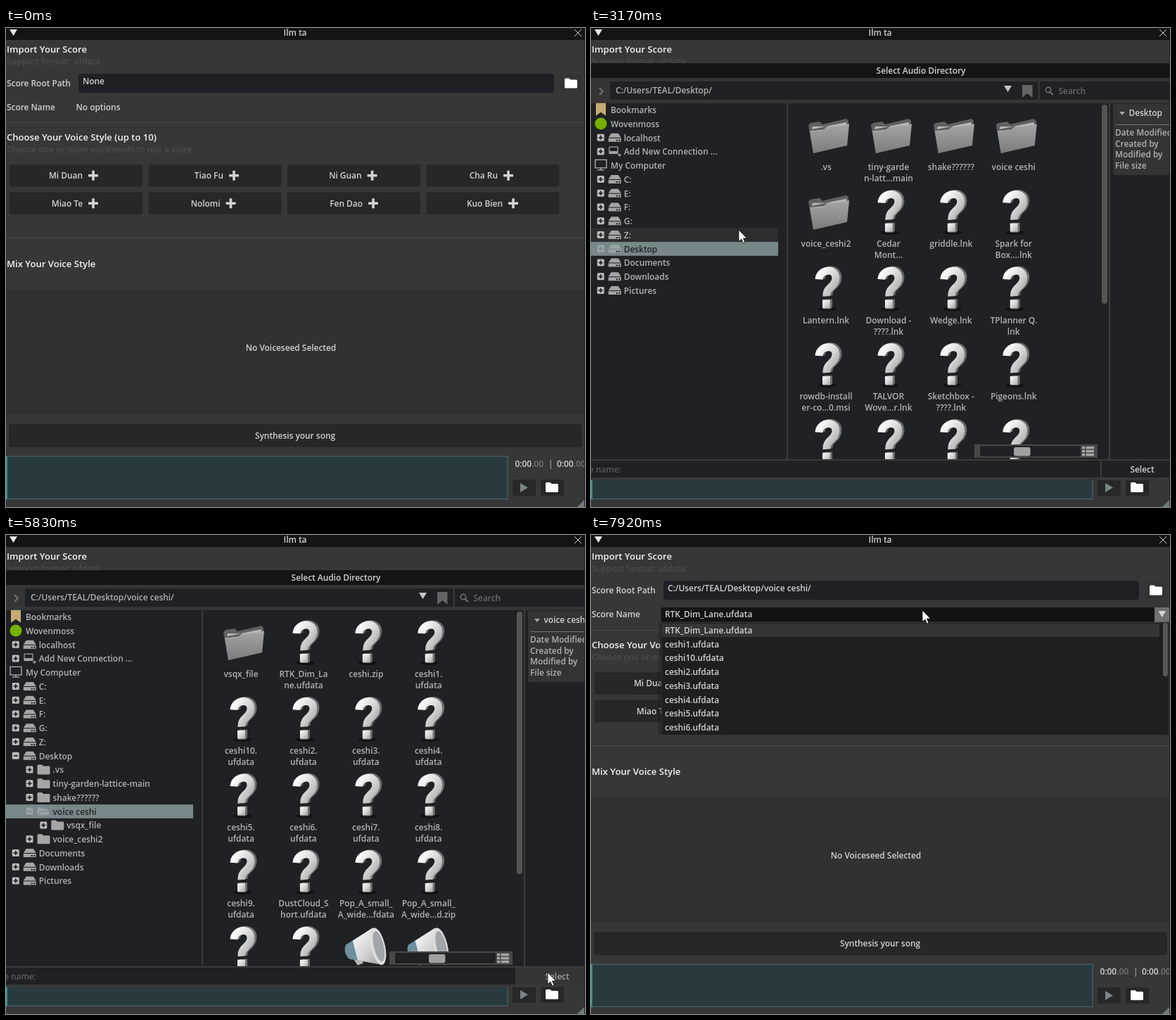
Animation, 823 px wide and 681 px high, one loop 8000 ms. Source, as an HTML page:

```html
<!DOCTYPE html>
<html lang="en">
<head>
<meta charset="utf-8">
<title>Voice mixer</title>
<style>
html, body { margin: 0; width: 100%; height: 100%; overflow: hidden; background: #363636; }
svg { display: block; width: 823px; height: 681px; font: 600 11.9px "Open Sans", "Noto Sans", sans-serif; }
text { white-space: pre; }
</style>
</head>
<body>
<svg viewBox="0 0 823 681">
  <defs>
    <linearGradient id="metal" x2="1" y2="1"><stop stop-color="#fff"/><stop offset=".55" stop-color="#d4d4d4"/><stop offset="1" stop-color="#a2a2a2"/></linearGradient>
    <linearGradient id="front" x2="0" y2="1"><stop stop-color="#a4a4a4"/><stop offset="1" stop-color="#7c7c7c"/></linearGradient>
    <linearGradient id="sideShade"><stop stop-opacity="0"/><stop offset="1" stop-opacity=".35"/></linearGradient>
    <clipPath id="gridClip"><path d="M280 107H736V613H280Z"/></clipPath>
    <g id="question">
      <ellipse cx="2" cy="-16" rx="13" ry="3" fill="#111214"/>
      <g fill="none" stroke-width="11">
        <path d="M-9-58C-8-73 15-75 15-60C15-47 1-48 2-34" stroke="#6d6d6d" transform="translate(2 -1)"/>
        <path d="M-9-58C-8-73 15-75 15-60C15-47 1-48 2-34" stroke="url(#metal)" transform="translate(-1)"/>
      </g>
      <path d="M-2-30H9V-18L6-16H-4Z" fill="#6d6d6d"/>
      <path d="M-5-29H6V-17H-5Z" fill="url(#metal)"/>
    </g>
    <g id="bigFolder">
      <path d="M-25-60L-22-63L-9-65L-5-61L29-69L32-66L30-31L-18-20Z" fill="#606060"/>
      <path d="M-20-54L29-64V-58H-19Z" fill="#b8b8b8"/>
      <path d="M-23-51L-3-53L1-57L33-61L30-31L-18-20Z" fill="url(#front)"/>
      <path d="M-23-51L-3-53L1-57L33-61" fill="none" stroke="#b4b4b4"/>
    </g>
    <g id="horn">
      <path d="M-20-33L-12-21L-4-24L-10-38Z" fill="#b9b9b9"/>
      <path d="M-29-50L9-74L22-22L-24-30Q-33-39-29-50Z" fill="#6f8f9d"/>
      <path d="M-19-56L9-74L22-22L-12-28Z" fill="url(#metal)"/>
      <ellipse cx="17" cy="-48" rx="10" ry="27" transform="rotate(-13 17 -48)" fill="#dcdcdc"/>
      <ellipse cx="18" cy="-48" rx="7" ry="22" transform="rotate(-13 18 -48)" fill="#a3a6a8"/>
    </g>
    <path id="folder" d="M0 1.500Q0 0 1.500 0H6.500L8.500 2H16.500Q18 2 18 3.500V12.500Q18 14 16.500 14H1.500Q0 14 0 12.500Z"/>
    <g id="drive"><path d="M4 0H14L18 6H0Z"/><path d="M0 7H18V12H0Z"/><path d="M11 9H13V11H11ZM14.500 9H16.500V11H14.500Z" fill="#1f2124"/></g>
  </defs>
  <g id="scene"></g>
</svg>
<script>
const LOOP = 8000, STEP = 1000 / 12;
const scene = document.getElementById("scene");
const SONG = "RTK_Dim_Lane.ufdata";
const HOME = "C:/Users/TEAL/";
const ROW = 19.75, COL_W = 88.9, CELL_H = 108.7;

// Pointer track: step, x, y
const TRACK = [
  [2, 165, 668], [4, 225, 600], [6, 390, 430], [8, 590, 235], [10, 745, 115], [11, 778, 91], [12, 788, 88], [14, 795, 87],
  [18, 795, 87], [20, 725, 115], [23, 490, 182], [26, 293, 236], [27, 225, 265], [28, 175, 288], [29, 135, 302], [31, 105, 313],
  [34, 105, 313], [38, 210, 287], [41, 420, 228], [44, 575, 186], [46, 592, 182],
  [54, 592, 184], [57, 630, 280], [60, 720, 490], [64, 770, 614], [65, 770, 622],
  [72, 770, 622], [73, 745, 606], [75, 620, 528], [77, 542, 479],
  [81, 542, 479], [82, 520, 470], [85, 307, 362], [87, 290, 310], [89, 380, 190], [91, 471, 107], [96, 471, 107]
];

function pointer(k) {
  const i = Math.max(1, TRACK.findIndex(p => p[0] >= k));
  const [a, b] = [TRACK[i - 1], TRACK[i]];
  const f = Math.max(0, (k - a[0]) / (b[0] - a[0]));
  return [a[1] + (b[1] - a[1]) * f, a[2] + (b[2] - a[2]) * f];
}

const rect = (x, y, x2, y2, fill, r = 0, extra = "") =>
  `<rect x="${x}" y="${y}" width="${x2 - x}" height="${y2 - y}" rx="${r}" fill="${fill}" ${extra}/>`;
const path = (d, fill, extra = "") => `<path d="${d}" fill="${fill}" ${extra}/>`;
const line = (d, color, width = 1) => path(d, "none", `stroke="${color}" stroke-width="${width}"`);
const use = (id, x, y, fill = "") => `<use href="#${id}" x="${x}" y="${y}" fill="${fill}"/>`;
const text = (x, y, s, fill = "#d2d2d2", extra = "") => `<text x="${x}" y="${y + 4.3}" fill="${fill}" ${extra}>${s}</text>`;
const centered = (x, y, s, fill) => text(x, y, s, fill, 'text-anchor="middle"');
const heading = (y, s) => text(1, y, s, "#f4f4f4", 'font-size="13.1"');

function voiceButtons() {
  const names = ["Mi Duan", "Tiao Fu", "Ni Guan", "Cha Ru", "Miao Te", "Nolomi", "Fen Dao", "Kuo Bien"];
  const plusX = [124, 324, 520.5, 714, 124, 319.5, 522, 721];
  return names.map((name, i) => {
    const x = 5 + i % 4 * 197.5, y = 194 + (i >> 2) * 39.5, px = plusX[i], py = y + 15.7;
    return rect(x, y, x + 189, y + 31.5, "#272727", 3) +
      text(px - 15, py, name, "#d2d2d2", 'text-anchor="end"') +
      line(`M${px - 7} ${py}h14M${px} ${py - 7}v14`, "#d2d2d2", 3.6);
  }).join("");
}

function mainWindow(loaded, hoverCombo, open) {
  const lower =
    line("M0 134.500H822", "#4b4b4b") +
    heading(156, "Choose Your Voice Style (up to 10)") +
    text(1, 172.5, "Choose one or more voiceseeds to mix a voice", "#4c4c4c") +
    voiceButtons() +
    line("M0 298.500H822", "#4b4b4b") +
    heading(335.5, "Mix Your Voice Style") +
    rect(0, 372, 822, 549, "#313131") +
    centered(405, 454.5, "No Voiceseed Selected") +
    rect(4, 563, 819, 596, "#272727", 2) +
    centered(411, 579.5, "Synthesis your song") +
    rect(.5, 609, 713, 669.5, "#293a3f", 0, 'stroke="#456c72"') +
    rect(0, 609, 1.8, 670, "#2aa5a0") +
    text(723.5, 619.5, '0:00<tspan fill="#747474">.00</tspan>') +
    text(771, 619.5, "|", "#a5a5a5") +
    text(783, 619.5, '0:00<tspan fill="#747474">.00</tspan>') +
    rect(720, 642, 753, 665, "#272727", 2) + path("M731 647L742 653.500L731 660Z", "#7c8587") +
    rect(760, 642, 793, 665, "#272727", 2) + use("folder", 767, 646, "#fff");
  return rect(0, 0, 823, 681, "#373737") + rect(0, 0, 823, 17, "#141414") +
    path("M5 2H16L10.500 11Z", "#e8e8e8") + centered(411, 7, "Ilm ta") +
    line("M808 2L818 12M818 2L808 12", "#d0d0d0") +
    heading(31, "Import Your Score") + text(1, 47.5, "Support format: ufdata", "#4c4c4c") +
    text(1, 78.5, "Score Root Path") + rect(103, 65, 779, 92, "#1f2025", 4) +
    text(109, 75.5, loaded ? HOME + "Desktop/voice ceshi/" : "None") +
    rect(787, 66, 818, 91, "#343434", 2) + use("folder", 794, 71.5, "#fff") +
    text(1, loaded ? 113 : 112.5, "Score Name") +
    `<g transform="translate(0 ${loaded ? 1.2 : 0})">${lower}</g>` +
    (loaded ? combo(hoverCombo) : text(99.5, 112.5, "No options")) +
    (open ? dropdown() : "") +
    path("M823 670V681H812Z", "#727a7b") + rect(822, 17, 823, 681, "#222");
}

const combo = hover => rect(99.5, 103, 801, 123.5, "#131313", 2) +
  rect(801, 103, 822, 123.5, hover ? "#707070" : "#1d1d1d") +
  path("M806.500 108H817L811.700 117Z", "#d4d4d4") + text(105, 113, SONG);

function dropdown() {
  const songs = [SONG, ...[1, 10, 2, 3, 4, 5, 6].map(n => `ceshi${n}.ufdata`)];
  return rect(94, 124, 100, 284, "url(#sideShade)") +
    rect(100, 124.5, 821.5, 284.5, "#1f1f1f", 0, 'stroke="#363636"') + rect(101, 126, 808, 145, "#353535") +
    songs.map((s, i) => text(105, 135.5 + i * ROW, s)).join("") +
    rect(813, 125, 820, 201, "#575757", 3);
}

// Tree entries: depth, icon, label, toggle sign
function treeRows(inside) {
  const drive = label => [1, "drive", label, "+"];
  const sub = inside ? [
    [2, "folder", ".vs", "+"], [2, "folder", "tiny-garden-lattice-main", "+"], [2, "folder", "shake??????", "+"],
    [2, "open", "voice ceshi", "-"], [3, "folder", "vsqx_file", "+"], [2, "folder", "voice_ceshi2", "+"]] : [];
  return [
    [0, "mark", "Bookmarks"], [0, "dot", "Wovenmoss"], drive("localhost"), [1, "link", "Add New Connection ...", "+"],
    [0, "screen", "My Computer"], ..."CEFGZ".split("").map(c => drive(c + ":")),
    [1, "drive", "Desktop", inside ? "-" : "+"], ...sub, ...["Documents", "Downloads", "Pictures"].map(drive)
  ];
}

const ICONS = {
  drive: (x, y, c) => use("drive", x, y - 6.5, c),
  folder: (x, y, c) => use("folder", x, y - 7.5, c),
  open: (x, y, c) => path(`M${x} ${y + 5}V${y - 6}h6l2 2h7v3H${x + 4}ZM${x + 5} ${y}H${x + 18}L${x + 15} ${y + 5}H${x + 1}Z`, c),
  mark: (x, y) => path(`M7 ${y - 10}H21V${y + 8}L14 ${y + 3}L7 ${y + 8}Z`, "#c3ab72"),
  dot: (x, y) => `<circle cx="14" cy="${y - .5}" r="8.5" fill="#76b000"/>`,
  screen: (x, y) => line(`M6 ${y - 8.5}H22V${y + 3}H6ZM14 ${y + 3}V${y + 6}M9 ${y + 6}H19`, "#b4b4b4", 1.3),
  link: (x, y, c) => line(`M26 ${y - 7}H38V${y + 2}H26ZM38 ${y + 4.5}h5M40.500 ${y + 2}v5`, c, 1.2) + rect(26, y - 1, 38, y + 3, c)
};

function tree(inside, selected, hoverY) {
  return treeRows(inside).map(([depth, icon, label, sign], i) => {
    const y = 116.8 + i * ROW, top = y - 10.2, px = depth * ROW - 6;
    const chosen = label === selected;
    const hover = hoverY >= top && hoverY < top + ROW;
    const color = chosen ? "#98a3a6" : "#a5a5a5";
    const back = chosen ? rect(0, top, 266, top + ROW, "#77878a") : hover ? rect(0, top, 266, top + ROW, "#2c2e30") : "";
    const toggle = sign ? rect(px - 5, y - 5.5, px + 5, y + 4.5, chosen ? "#98a3a6" : "#bcbcbc", 1.5) +
      line(`M${px - 3} ${y - .5}h6` + (sign === "+" ? `M${px} ${y - 3.5}v6` : ""), chosen ? "#77878a" : "#1f2124", 1.8) : "";
    return back + toggle + ICONS[icon](px + 11, y, color) + text(px + (depth ? 33 : 34), y, label, chosen ? "#202224" : "#b2b2b2");
  }).join("");
}

const DESKTOP = [
  ".vs", "tiny-garde/n-latt...main", "shake??????", "voice ceshi", "voice_ceshi2", "Cedar/Mont...", "griddle.lnk", "Spark for/Box....lnk",
  "Lantern.lnk", "Download -/????.lnk", "Wedge.lnk", "TPlanner Q./lnk", "rowdb-install/er-co...0.msi", "TALVOR/Wove...r.lnk",
  "Sketchbox -/????.lnk", "Pigeons.lnk"];
const ceshi = n => `ceshi${n}./ufdata`;
const VOICES = [
  "vsqx_file", "RTK_Dim_La/ne.ufdata", "ceshi.zip", ceshi(1), ceshi(10), ...[2, 3, 4, 5, 6, 7, 8, 9].map(ceshi),
  "DustCloud_S/hort.ufdata", "Pop_A_small_/A_wide...fdata", "Pop_A_small_/A_wide...d.zip"];

function files(inside, [mx, my]) {
  const labels = inside ? VOICES : DESKTOP, folders = inside ? 1 : 5;
  let out = "";
  for (let i = 0; i < 20; i++) {
    const x = 334 + i % 4 * COL_W, y = 198 + Math.floor(i / 4) * CELL_H;
    const hover = Math.abs(mx - x) < 37 && my > y - 84 && my < y + 30 && my < 613;
    const icon = i < folders ? "bigFolder" : inside && i > 17 ? "horn" : "question";
    out += (hover ? rect(x - 37, y - 84, x + 37.5, y + 30, "#3a3b3b") : "") + use(icon, x, y) +
      (labels[i] || "").split("/").map((s, n) => centered(x, y + n * 15.8, s, "#b2b2b2")).join("");
  }
  return `<g clip-path="url(#gridClip)">${out}</g>` + rect(726, 109, 734, inside ? 482 : 392, "#555", 4);
}

function zoomBar() {
  let dots = "";
  for (let i = 0; i < 3; i++) {
    const y = 595 + i * 5;
    dots += rect(698, y, 702, y + 3.5, "#a5a5a5") + rect(703.5, y, 715, y + 3.5, "#a5a5a5");
  }
  return rect(545, 592, 720, 611, "#484848") + rect(553, 594, 696, 609, "#1f2124", 2) + rect(601, 596, 624.5, 608.5, "#a0a0a0", 3) + dots;
}

function dialog(k, mouse) {
  const inside = k >= 51, picked = k >= 35, onSelect = k >= 64;
  const selected = inside ? "voice ceshi" : picked ? "Desktop" : "";
  const folder = inside ? "Desktop/voice ceshi/" : picked ? "Desktop/" : "";
  const before = pointer(k - 1);
  const facts = ["Date Modified", "Created by", "Modified by", "File size"];
  return rect(0, 50, 822, 639, "#1f2124") + rect(0, 639, 822, 643, "#373737") +
    rect(0, 50, 822, 71, "#141414") + centered(469, 61, "Select Audio Directory") +
    rect(0, 71, 822, 107, "#353535") + rect(27, 76, 635.5, 102, "#1f2124") + rect(638, 76, 822, 102, "#1f2124") +
    line("M12 85L17 90L12 95", "#747474", 1.8) + text(35, 89, HOME + folder, "#b2b2b2") +
    path("M587 82H598L592.500 91Z", "#c6c6c6") + path("M613 81H627.500V99L620.200 93L613 99Z", "#646464") +
    `<circle cx="650" cy="88" r="3.7" fill="none" stroke="#747474" stroke-width="1.5"/>` + line("M652.500 91L656.500 95", "#747474", 1.8) +
    text(664.5, 90, "Search", "#686868") +
    tree(inside, selected, before[0] < 266 ? before[1] : -1) +
    rect(278, 107, 280, 613, "#3b3b3b") + rect(736, 107, 738, 613, "#3b3b3b") +
    (k >= 33 ? files(inside, mouse) : "") + zoomBar() +
    rect(742, 108, 822, 209, "#343434", 2) + path("M751 119H759L755 124Z", "#a5a5a5") +
    text(764.5, 121, selected || "No files selected", "#d2d2d2") + line("M745 137.500H822", "#747474") +
    facts.map((s, i) => text(745, 148.5 + i * 15.8, s, "#b2b2b2")).join("") +
    rect(0, 613, 822, 615, "#3b3b3b") + text(-3, 627.5, "e name:", "#5a5a5a") +
    (onSelect ? rect(724, 615, 822, 639, "#343635") : rect(724, 615, 726, 639, "#3b3b3b")) +
    centered(783.5, 627.5, "Select", onSelect ? "#a0a0a0" : "#d2d2d2") +
    rect(822, 17, 823, 681, "#222");
}

function cursor([x, y]) {
  return `<path transform="translate(${x} ${y})" d="M0 0V16.500L3.800 13L6.500 19L9 18L6.400 12H11.500Z" fill="#fff" stroke="#111" stroke-width=".8"/>`;
}

function render(k) {
  const mouse = pointer(k);
  scene.innerHTML = mainWindow(k >= 71, k >= 90, k >= 95) +
    (k >= 18 && k < 71 ? dialog(k, mouse) : "") +
    (k >= 2 ? cursor(mouse) : "");
}

let shown = -1;
function tick(now) {
  const k = Math.floor((now % LOOP + 5) / STEP) % 96;
  if (k !== shown) render(shown = k);
  requestAnimationFrame(tick);
}
tick(performance.now());
</script>
</body>
</html>
```
